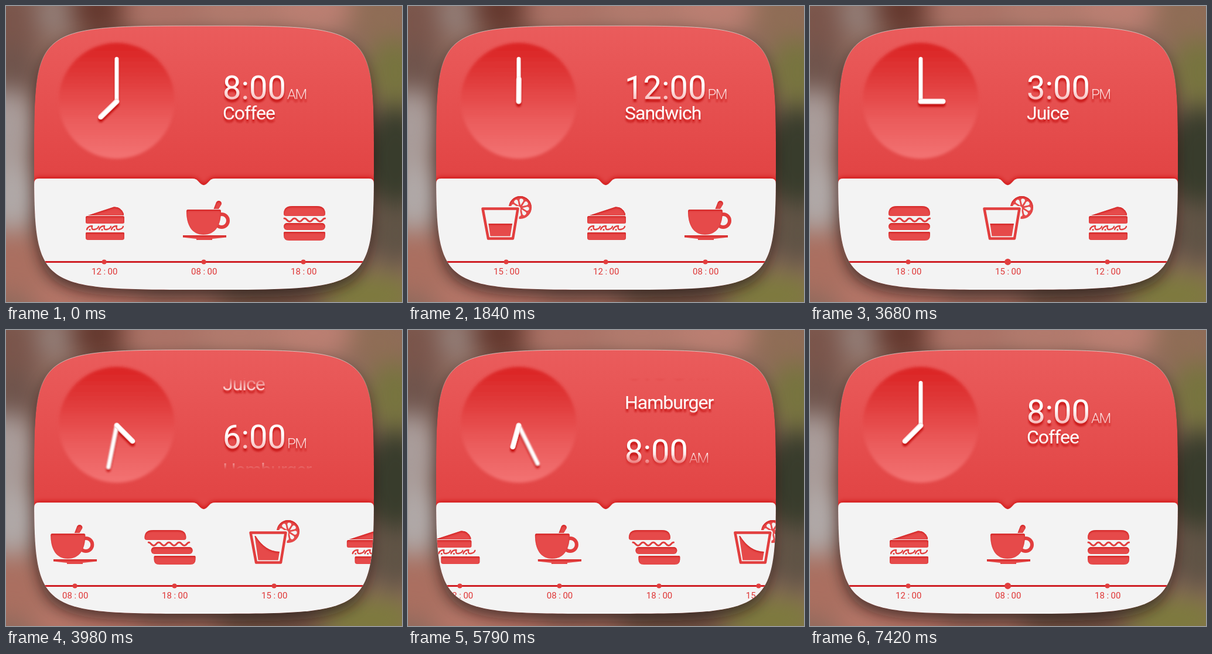
An HTML page for the animation above (7450 ms loop, 676 by 506 pixels).

```html
<!DOCTYPE html>
<html lang="en">
<head>
<meta charset="utf-8">
<title>Meal clock</title>
<style>
html, body { margin: 0; width: 100%; height: 100%; overflow: hidden; background: #8d6a5d; }
svg { display: block; width: 676px; height: 506px; }
text { font-family: Roboto, "Open Sans", sans-serif; white-space: pre; }
.time { font-size: 56px; fill: url(#timeFill); }
.half { font-size: 24px; font-weight: 300; letter-spacing: -1.5px; }
.name { font-size: 32px; letter-spacing: -1px; fill: url(#nameFill); }
.hour { font-size: 15px; fill: #df3636; }
.ink { fill: #e64a4a; filter: url(#inset); }
.line { fill: none; stroke: #e23e3e; stroke-linecap: round; stroke-linejoin: round; }
</style>
</head>
<body>
<svg viewBox="0 0 676 506">
  <defs>
    <linearGradient id="panelFill" x1="0" y1="0" x2="0" y2="1">
      <stop offset="0" stop-color="#ea5c5c"/><stop offset=".55" stop-color="#e24545"/>
    </linearGradient>
    <linearGradient id="dialFill" x1="0" y1="0" x2="0" y2="1">
      <stop offset="0" stop-color="#db2323"/><stop offset=".3" stop-color="#e03a3a"/>
      <stop offset=".65" stop-color="#ea5a5a"/><stop offset="1" stop-color="#f37373"/>
    </linearGradient>
    <linearGradient id="timeFill" gradientUnits="userSpaceOnUse" x1="0" y1="-36" x2="0" y2="2">
      <stop offset=".3" stop-color="#fff"/><stop offset="1" stop-color="#f8bcbc"/>
    </linearGradient>
    <linearGradient id="nameFill" gradientUnits="userSpaceOnUse" x1="0" y1="-24" x2="0" y2="4">
      <stop offset=".4" stop-color="#fff"/><stop offset="1" stop-color="#fde0e0"/>
    </linearGradient>
    <linearGradient id="fade" gradientUnits="userSpaceOnUse" x1="0" y1="82" x2="0" y2="238">
      <stop offset="0" stop-color="#000"/><stop offset=".15" stop-color="#fff"/>
      <stop offset=".84" stop-color="#fff"/><stop offset="1" stop-color="#000"/>
    </linearGradient>
    <linearGradient id="rimFill" gradientUnits="userSpaceOnUse" x1="0" y1="34" x2="0" y2="150">
      <stop offset="0" stop-color="#fff" stop-opacity=".6"/><stop offset="1" stop-color="#fff" stop-opacity="0"/>
    </linearGradient>
    <mask id="window" maskUnits="userSpaceOnUse" x="340" y="60" width="260" height="200">
      <rect x="340" y="60" width="260" height="200" fill="url(#fade)"/>
    </mask>
    <filter id="haze" filterUnits="userSpaceOnUse" x="-120" y="-120" width="916" height="746" color-interpolation-filters="sRGB"><feGaussianBlur stdDeviation="20"/></filter>
    <filter id="soft" filterUnits="userSpaceOnUse" x="0" y="0" width="676" height="506"><feGaussianBlur stdDeviation="2.8"/></filter>
    <filter id="cast" filterUnits="userSpaceOnUse" x="0" y="0" width="676" height="560"><feGaussianBlur stdDeviation="12"/></filter>
    <filter id="drop" filterUnits="userSpaceOnUse" x="0" y="0" width="676" height="506">
      <feDropShadow dx="0" dy="5" stdDeviation="1.8" flood-color="#c81616"/>
    </filter>
    <filter id="lip" filterUnits="userSpaceOnUse" x="0" y="250" width="676" height="256">
      <feDropShadow dx="0" dy="-1" stdDeviation="4" flood-color="#cc0a0a"/>
    </filter>
    <filter id="inset" filterUnits="userSpaceOnUse" x="-70" y="315" width="140" height="95" color-interpolation-filters="sRGB">
      <feOffset in="SourceAlpha" dy="2"/><feGaussianBlur stdDeviation="1.6" result="inner"/>
      <feFlood flood-color="#cf1c1c" flood-opacity=".85"/>
      <feComposite in2="inner" operator="out"/><feComposite in2="SourceAlpha" operator="in" result="edge"/>
      <feMerge><feMergeNode in="SourceGraphic"/><feMergeNode in="edge"/></feMerge>
    </filter>
    <path id="panel" d="M48 259.500C48 34 48 34 338 34S628 34 628 259.500S628 485 338 485S48 485 48 259.500Z"/>
    <clipPath id="panelClip"><use href="#panel"/></clipPath>
    <clipPath id="glassClip"><path d="M-34 349H14L6.500 393.500H-27.500Z"/></clipPath>
  </defs>

  <rect width="676" height="506" fill="#8d6a5d"/>
  <g id="backdrop" filter="url(#haze)"></g>
  <use href="#panel" y="13" fill="#1d0c0a" opacity=".58" filter="url(#cast)"/>

  <g clip-path="url(#panelClip)">
    <use href="#panel" fill="url(#panelFill)"/>
    <circle cx="189" cy="162" r="99" fill="url(#dialFill)" filter="url(#soft)"/>
    <g filter="url(#drop)">
      <g id="minute"><rect x="-3.500" y="-76" width="7" height="79" rx="3.500" fill="#fbe2e2"/><rect x="-2.700" y="-75.500" width="5" height="78" rx="2.500" fill="#fff"/></g>
      <g id="hour"><rect x="-4.500" y="-42.500" width="9" height="47" rx="4.500" fill="#f9d6d6"/><rect x="-3.500" y="-42" width="6.500" height="45" rx="3.200" fill="#fff"/></g>
    </g>
    <g mask="url(#window)"><g id="words" filter="url(#drop)"></g></g>
    <path filter="url(#lip)" fill="#f3f3f3" d="M48 304Q48 295 56 295H318C327 295 328 301 333 304.500Q337.500 308 342 304.500C347 301 348 295 357 295H620Q628 295 628 304V495H48Z"/>
    <rect x="40" y="436" width="600" height="3" fill="#cf1f24"/>
    <g id="track"></g>
  </g>
  <use href="#panel" fill="none" stroke="url(#rimFill)"/>
</svg>
<script>
const LOOP = 7450, FIRST = 1810, STEP = 1870, GAP = 170, MID = 338, TRAVEL = 147;
const $ = id => document.getElementById(id);

function add(parent, tag, attrs = {}, text) {
  const el = document.createElementNS("http://www.w3.org/2000/svg", tag);
  for (const key in attrs) el.setAttribute(key, attrs[key]);
  if (text) el.textContent = text;
  return parent.appendChild(el);
}
const set = (el, transform) => el.setAttribute("transform", transform);
const clamp = x => Math.min(1, Math.max(0, x));

// Smooth interpolation through [time, value] points
function keys(points, t) {
  if (t <= points[0][0]) return points[0][1];
  for (let i = 1; i < points.length; i++) {
    const [a, from] = points[i - 1], [b, to] = points[i];
    if (t < b) {
      const x = (t - a) / (b - a);
      return from + (to - from) * x * x * (3 - 2 * x);
    }
  }
  return points[points.length - 1][1];
}

// cubic-bezier(.25, .1, .25, 1)
function ease(x) {
  x = clamp(x);
  let lo = 0, hi = 1;
  for (let i = 0; i < 24; i++) {
    const s = (lo + hi) / 2;
    if (.75 * s * (1 - s) + s ** 3 < x) lo = s; else hi = s;
  }
  return .3 * lo * (1 - lo) ** 2 + 3 * lo * lo * (1 - lo) + lo ** 3;
}

// Blurred backdrop: x, y, rx, ry, colour
[
  [10, 30, 50, 60, "#7a554b"], [85, 15, 35, 35, "#94807a"], [165, 5, 55, 50, "#65392f"],
  [10, 115, 50, 50, "#6f544c"], [270, 5, 75, 50, "#ab7266"], [400, 5, 80, 45, "#b27a6d"],
  [525, 5, 75, 45, "#bb7f72"], [640, 20, 55, 50, "#8f6d56"], [665, 115, 50, 60, "#77743f"],
  [665, 260, 60, 90, "#383c2c"], [665, 390, 50, 55, "#5f5345"], [5, 210, 45, 70, "#a99d9b"],
  [10, 325, 45, 65, "#b0a9a8"], [10, 440, 70, 55, "#aa6f60"], [150, 500, 110, 45, "#b57567"],
  [310, 505, 80, 40, "#9c6a5c"], [450, 505, 90, 45, "#6f5344"], [620, 495, 85, 40, "#7d7a3e"]
].forEach(([cx, cy, rx, ry, fill]) => add($("backdrop"), "ellipse", { cx, cy, rx, ry, fill }));

const meals = [
  { name: "Coffee", time: "8:00", half: "AM", hour: "08", angle: 225 },
  { name: "Sandwich", time: "12:00", half: "PM", hour: "12", angle: 360 },
  { name: "Juice", time: "3:00", half: "PM", hour: "15", angle: 90 },
  { name: "Hamburger", time: "6:00", half: "PM", hour: "18", angle: 180 }
];

// Each icon returns its loose layers as [element, lag in px]
const ink = (g, d) => add(g, "path", { d, class: "ink" });
const layer = (g, lag) => [add(g, "g"), lag];

function coffee(g) {
  const parts = [layer(g, 18), layer(g, 12), layer(g, 1)];
  ink(parts[0][0], "M16.500 347L21 335.500A4.700 4.700 0 0 1 29.500 339.500L25 347Z");
  add(parts[1][0], "circle", { cx: 30, cy: 367, r: 11, class: "line", "stroke-width": 6 });
  ink(parts[1][0], "M-27 348H26Q29 348 29 351C29 374 20 391 -1 391C-21 391 -30 374 -30 351Q-30 348 -27 348Z");
  ink(parts[2][0], "M-36 392H38V395.500L14 398V400H-13V398L-36 395.500Z");
  return parts;
}

function sandwich(g) {
  const parts = [layer(g, 14.5), layer(g, 6.5), layer(g, .5)];
  ink(parts[0][0], "M-28 358L16 343.500Q28 342.500 33 355V358Z");
  ink(parts[0][0], "M-29 359H31Q34 359 34 362V369Q34 372 31 372H-29Q-32 372 -32 369V362Q-32 359 -29 359Z");
  for (const x of [-30, -9, 12]) {
    add(parts[1][0], "path", { d: `M${x} 382q2-6 9-6q-2 7 4 6t7-5`, class: "line", "stroke-width": 2.4 });
    add(parts[1][0], "circle", { cx: x + 5, cy: 382.5, r: 1.5, fill: "#e23e3e" });
  }
  ink(parts[2][0], "M-30 387H32Q34 387 34 389V396Q34 400 30 400H-28Q-32 400 -32 396V389Q-32 387 -30 387Z");
  return parts;
}

function juice(g) {
  const glass = "M-40.500 346.500H19.500L11 397.500H-31Z";
  ink(g, "M4 344.500a19.500 19.500 0 1 1 39 0a19.500 19.500 0 1 1 -39 0Z");
  for (let a = 10; a < 360; a += 45)
    add(g, "path", { d: "M0 -4L-3.300 -11.500Q-3.800 -15.300 0 -15.300T3.300 -11.500Z", fill: "#f3f3f3", transform: `translate(23.5 344.5) rotate(${a})` });
  add(g, "path", { d: glass, fill: "#f3f3f3", stroke: "#f3f3f3", "stroke-width": 9, "stroke-linejoin": "round" });
  add(g, "path", { d: glass, class: "line", "stroke-width": 4.5 });
  g.liquid = ink(add(g, "g", { "clip-path": "url(#glassClip)" }), "");
  g.bubble = add(g, "circle", { cx: 11.5, r: 2.6, fill: "#e23e3e" });
  return [];
}

function burger(g) {
  const parts = [layer(g, 18), layer(g, 12), layer(g, 6.5), layer(g, 1.5)];
  ink(parts[0][0], "M-34 355Q-34 342 -19 342H22Q37 342 37 355Q37 359 33 359H-30Q-34 359 -34 355Z");
  let wave = "M-33 363";
  for (let i = 0; i < 8; i++) {
    const dy = i % 2 ? -5.5 : 5.5;
    wave += `c4.4 0 4.4 ${dy} 8.7 ${dy}`;
  }
  add(parts[1][0], "path", { d: wave, class: "line", "stroke-width": 3 });
  ink(parts[2][0], "M-28.500 371H31.500A5.500 6 0 0 1 31.500 383H-28.500A5.500 6 0 0 1 -28.500 371Z");
  ink(parts[3][0], "M-32 386H35Q37 386 37 388V392Q37 401 28 401H-25Q-34 401 -34 392V388Q-34 386 -32 386Z");
  return parts;
}

const items = [coffee, sandwich, juice, burger].map((draw, i) => {
  const root = add($("track"), "g"), icon = add(root, "g");
  const parts = draw(icon);
  const dot = add(root, "circle", { cx: -.4, cy: 437.4, fill: "#e23e3e" });
  const label = add(root, "text", { x: -22, y: 459, class: "hour" }, meals[i].hour);
  add(label, "tspan", { dx: 3.5 }, ":");
  add(label, "tspan", { dx: 3.5 }, "00");
  return { root, icon, parts, dot };
});

const words = [0, 1].map(() => {
  const time = add($("words"), "text", { class: "time" });
  return {
    time, digits: add(time, "tspan"), half: add(time, "tspan", { class: "half", dx: 2 }),
    name: add($("words"), "text", { class: "name" })
  };
});

function showWords(w, meal, timeShift, nameShift) {
  w.digits.textContent = meal.time;
  w.half.textContent = meal.half;
  w.name.textContent = meal.name;
  set(w.time, `translate(370 ${158.5 + timeShift})`);
  set(w.name, `translate(370 ${194 + nameShift})`);
}

const LAG = [[60, 0], [150, .85], [240, 1], [360, .95], [560, 0]];
const BOUNCE = [[540, 0], [640, .22], [670, .22], [720, 0]];
const SLOSH = [[60, 0], [180, 1], [370, 1], [580, .1], [660, -.2], [760, -.62], [920, .12], [1050, -.08], [1160, 0]];
const SHRINK = [[-30, 7], [0, 5.5], [30, 4]];
const GROW = [[540, 4], [650, 8.5], [670, 8.5], [720, 7]];

function liquid(tilt) {
  const k = Math.abs(tilt), up = 372 - 20 * k, down = 372 + 7 * k;
  const [left, right] = tilt > 0 ? [up, down] : [down, up];
  const bow = (left + right) / 2 + 14 * k * k;
  return `M-32 ${left}Q${-11 - 4 * tilt} ${bow} 10 ${right}H30V400H-50V${left}Z`;
}

// Step index and time since that step began; the first step straddles the loop point
function locate(t) {
  const last = FIRST + 3 * STEP;
  if (t >= last) return [0, t - last];
  if (t < FIRST) return [0, t + (t < 30 ? 30 : 60)];
  return [1 + Math.floor((t - FIRST) / STEP), (t - FIRST) % STEP];
}

function render(now) {
  const [k, elapsed] = locate(now % LOOP);
  const e = Math.floor(elapsed / 30) * 30;
  const next = (k + 1) % 4, from = meals[k], to = meals[next];
  const slide = ease((e - 64) / 566), nameSlide = ease((e - 111) / 525);
  const lag = keys(LAG, e), bounce = keys(BOUNCE, e);

  const turn = .5 - .5 * Math.cos(Math.PI * clamp(e / 600));
  const sweep = (to.angle - from.angle + 360) % 360;
  const x = clamp((e - 30) / 630), spin = x + .42 * x * (1 - x);
  set($("hour"), `translate(189 163) rotate(${from.angle + sweep * turn})`);
  set($("minute"), `translate(189 163) rotate(${360 * spin})`);
  $("minute").style.filter = e > 30 && e < 600 ? "blur(1.2px)" : "none";

  showWords(words[0], from, -TRAVEL * slide, -TRAVEL * nameSlide);
  showWords(words[1], to, TRAVEL * (1 - slide), TRAVEL * (1 - nameSlide));

  items.forEach(({ root, icon, parts, dot }, i) => {
    const slot = (k - i + 6) % 4 - 2;
    set(root, `translate(${MID + GAP * (slot + slide)} 0)`);
    const pull = i === 3 ? lag - bounce : lag;
    for (const [el, px] of parts) set(el, `translate(${-px * pull} 0)`);
    dot.setAttribute("r", i === k ? keys(SHRINK, e) : i === next ? keys(GROW, e) : 4);
    if (icon.liquid) {
      icon.liquid.setAttribute("d", liquid(keys(SLOSH, e)));
      icon.bubble.setAttribute("visibility", e >= 600 && e < 720 ? "visible" : "hidden");
      icon.bubble.setAttribute("cy", 358 + ((e - 660) / 30) ** 2);
    }
  });
}

const start = performance.now();
function tick() {
  render(performance.now() - start);
  requestAnimationFrame(tick);
}
tick();
</script>
</body>
</html>
```
